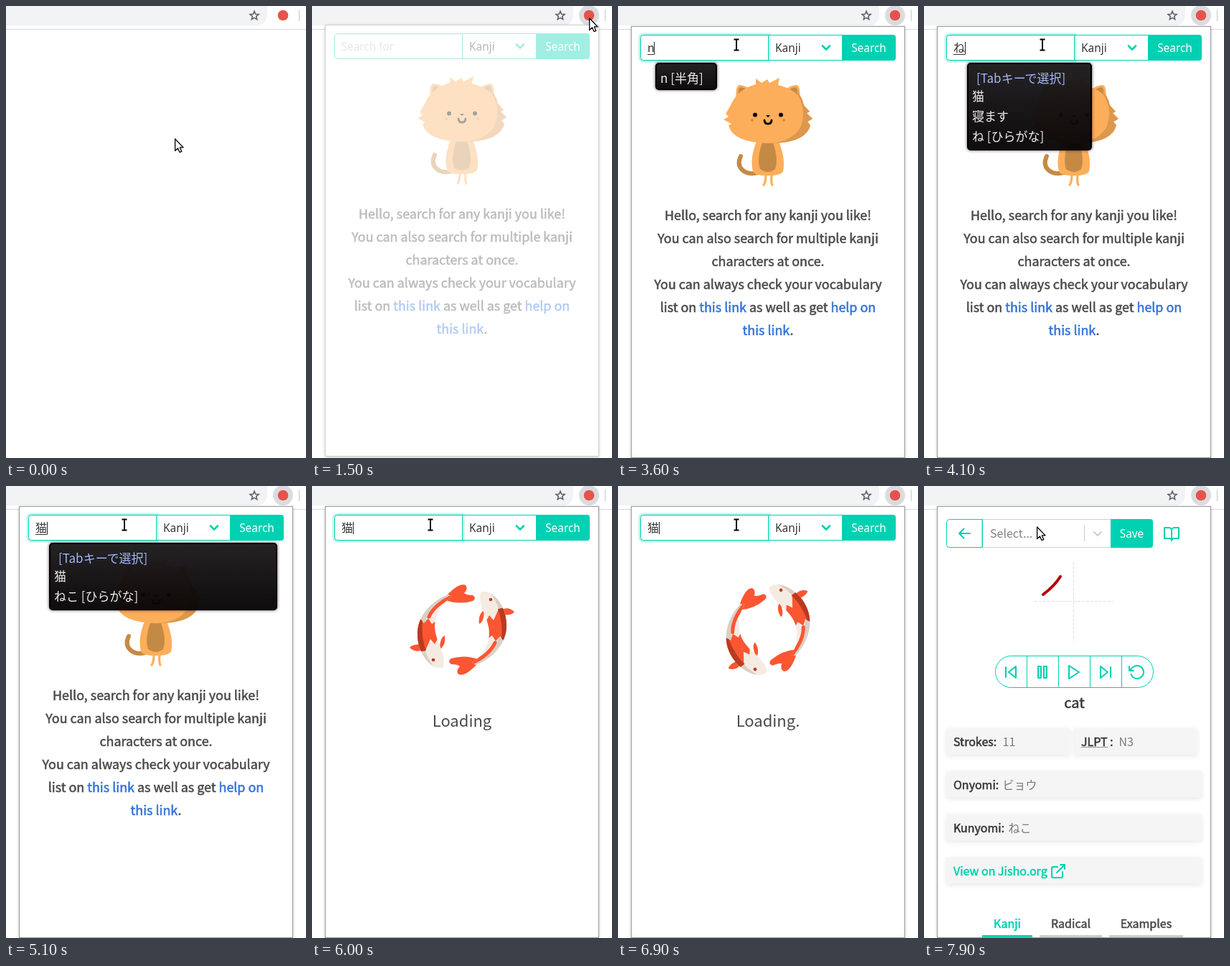
An HTML page that plays this animation: 418 by 629 pixels, repeating every 8000 ms.

```html
<!DOCTYPE html>
<html lang="en">
<head>
<meta charset="utf-8">
<title>Kanji search popup</title>
<style>
  html, body { margin: 0; width: 100%; height: 100%; overflow: hidden; background: #fff; }
  svg { display: block; }
  text { font: 16px "Noto Sans CJK JP", "Noto Sans CJK", sans-serif; fill: #4a4a4a; white-space: pre; }
  .ui { font: 15.4px "Noto Sans", sans-serif; }
  .mid { text-anchor: middle; }
  .bold { stroke: #4a4a4a; stroke-width: .55; }
  .dark { fill: #363636; stroke: #363636; }
  .teal { fill: #00d1b2; stroke: #00d1b2; }
  .hello { font-size: 17.9px; }
  .link { fill: #3273dc; stroke: #3273dc; }
  .white { fill: #fff; }
  .soft { fill: #7a7a7a; }
  .line { fill: none; stroke: #00d1b2; }
  .icon { fill: none; stroke: #00d1b2; stroke-width: 2; stroke-linecap: round; stroke-linejoin: round; }
  .card { fill: #f5f5f5; filter: drop-shadow(0 2px 3px rgba(0,0,0,.09)); }
  #ime text { font-size: 17px; fill: #eee; }
  #ime .tip { fill: #a3b6fb; }
</style>
</head>
<body>
<svg width="418" height="629" viewBox="0 0 418 629">
  <defs>
    <linearGradient id="glass" x2="0" y2="1">
      <stop offset="0" stop-color="#1c1c1c" stop-opacity=".9"/>
      <stop offset="1" stop-color="#000" stop-opacity=".87"/>
    </linearGradient>
    <path id="koiBody" d="M235 148C247 141 272 163 271 196C270 221 251 240 228 249L223 246C240 235 250 215 246 196C243 180 231 166 235 148Z"/>
    <clipPath id="koiClip"><use href="#koiBody"/></clipPath>
    <g id="koi">
      <path fill="#fb5632" d="M239 173Q231 180 233 192Q239 190 240 176ZM260 176Q271 165 282 175Q278 181 262 179Z"/>
      <path fill="#fb5632" d="M234 242Q214 234 194 240Q188 244 194 248Q203 248 206 251Q200 257 204 262Q213 266 230 248Z"/>
      <use href="#koiBody" fill="#f4ebe3"/>
      <g clip-path="url(#koiClip)">
        <path fill="#d9d0c6" d="M244 143Q264 166 264 196Q262 224 226 249L275 240V140Z"/>
        <path fill="#fb5632" d="M240 193L247 180L253 187L260 171L276 168V210L267 215L262 209L256 216L251 208L244 213Z"/>
        <path fill="#b93a22" d="M259 171Q266 188 264 212L267 215L276 210V168Z"/>
        <path fill="none" stroke="#fb5632" stroke-width="5" stroke-linecap="round" d="M255 218Q248 234 224 246"/>
      </g>
      <circle cx="249" cy="158" r="2.3" fill="#b93a22"/>
    </g>
  </defs>

  <!-- browser toolbar -->
  <path fill="#f1f3f4" d="M0 0H364V13A14 14 0 0 1 350 27H0Z"/>
  <path fill="none" stroke="#5f6368" stroke-width="1.6" d="M346 7.2L347.7 11.2L352 11.6L348.7 14.4L349.7 18.6L346 16.4L342.3 18.6L343.3 14.4L340 11.6L344.3 11.2Z"/>
  <path stroke="#d5dad9" d="M0 32.5H418"/>
  <path stroke="#c4c7c9" d="M408.5 5V21"/>
  <circle id="halo" cx="386" cy="13" r="14"/>
  <circle cx="386" cy="13" r="7.3" fill="#e5534b"/>

  <g id="popup">
    <rect x="18.5" y="28.5" width="381" height="600" fill="#fff" style="filter:drop-shadow(0 1px 2px rgba(0,0,0,.25))"/>
    <g id="inner">
      <rect x="18.5" y="28.5" width="381" height="600" fill="none" stroke="#9a9a9a"/>

      <g id="searchBar">
        <rect class="line" x="209.5" y="40.5" width="110" height="35"/>
        <text class="ui dark" stroke="none" style="stroke:none" x="219" y="63.5">Kanji</text>
        <path class="icon" style="stroke-width:2.6" d="M285 55.5L290 60.5L295 55.5"/>
        <path fill="#00d1b2" d="M312 40H383a4 4 0 0 1 4 4V72a4 4 0 0 1 -4 4H312Z"/>
        <text class="ui white mid" x="349.5" y="63.5">Search</text>
        <path id="glow" fill="none" stroke="#00d1b2" stroke-opacity=".25" stroke-width="5" d="M210 40H35a4 4 0 0 0 -4 4V72a4 4 0 0 0 4 4H210Z"/>
        <path fill="#fff" stroke="#00d1b2" d="M209.5 40.5H35.5a4 4 0 0 0 -4 4V71.5a4 4 0 0 0 4 4H209.5Z"/>
        <path stroke="#000" stroke-opacity=".05" d="M34 41.5H209"/>
        <text id="hint" class="ui" style="fill:#bfbfbf" x="40.5" y="63.5">Search for</text>
        <text id="typed" class="dark" style="stroke:none" x="41" y="64"></text>
        <path id="under" stroke="#363636" d=""/>
        <path id="caret" stroke="#222" d=""/>
      </g>

      <g id="welcome">
        <path fill="none" stroke="#c48a45" stroke-width="6" stroke-linecap="round" d="M194 232C178 236 163 226 171 209"/>
        <path fill="none" stroke="#fdae5a" stroke-width="3.2" stroke-linecap="round" d="M206 234Q206 245 203 249M214 234Q213 246 215 249"/>
        <path fill="#fdae5a" d="M194 186Q183 212 188 230Q190 236 209 236Q227 236 230 230Q234 212 223 186Z"/>
        <path fill="#c48a45" d="M201 190H216Q224 213 219 227Q209 235 198 227Q193 213 201 190Z"/>
        <path fill="#fdae5a" d="M165 132Q163 111 169 110Q178 110 187 118ZM253 132Q255 111 249 110Q240 110 231 118Z"/>
        <path fill="#c48a45" d="M168 128Q166 114 171 113Q178 114 183 119ZM250 128Q252 114 247 113Q240 114 235 119Z"/>
        <path fill="#fdae5a" d="M157 138Q166 116 192 109L192 101L200 107L208 102L211 107L225 100L223 110Q252 117 259 138L267 147L263 149L271 157L264 161L268 166Q262 191 209 191Q160 190 154 166L158 164L147 158L154 154L150 150Z"/>
        <path fill="#dc984c" d="M246 117Q264 142 255 167Q245 187 215 191Q262 190 268 166L264 161L271 157L263 149L267 147L259 138Q256 123 246 117Z"/>
        <circle cx="191" cy="151.5" r="3"/><circle cx="227" cy="151.5" r="3"/>
        <circle cx="187" cy="159" r="2" fill="#d18e45"/><circle cx="231" cy="159" r="2" fill="#d18e45"/>
        <path d="M206 152H212L209 155Z"/>
        <path fill="none" stroke="#000" stroke-width="2.8" stroke-linecap="round" d="M204 159Q204.500 164 209 164Q213.500 164 214 159"/>
        <g class="mid">
          <text class="hello bold" x="209" y="298">Hello, search for any kanji you like!</text>
          <text class="hello bold" x="209" y="330">You can also search for multiple kanji</text>
          <text class="hello bold" x="209" y="362">characters at once.</text>
          <text class="hello bold" x="209" y="394">You can always check your vocabulary</text>
          <text class="hello bold" x="209" y="426">list on <tspan class="link">this link</tspan> as well as get <tspan class="link">help on</tspan></text>
          <text class="hello bold" x="209" y="458"><tspan class="link">this link</tspan>.</text>
        </g>
      </g>

      <g id="loading">
        <g id="spin"><use href="#koi"/><use href="#koi" transform="rotate(180 209 200)"/></g>
        <text id="wait" class="mid" style="font-size:22px" x="209" y="335"></text>
      </g>

      <g id="result">
        <rect x="80.500" y="46.500" width="182" height="39" fill="#fff" stroke="#c5d6d3"/>
        <path class="line" d="M81.500 46.500H35.500a4 4 0 0 0 -4 4V81.500a4 4 0 0 0 4 4H81.500Z"/>
        <path class="icon" d="M64 66H49M55.500 59.500L49 66L55.500 72.500"/>
        <text x="92" y="72" style="fill:#808080">Select...</text>
        <path stroke="#ccc" d="M223.500 55V77"/>
        <path class="icon" style="stroke:#ccc" d="M237 64L242 69L247 64"/>
        <path fill="#00d1b2" d="M260 46H315a4 4 0 0 1 4 4V82a4 4 0 0 1 -4 4H260Z"/>
        <text class="ui white mid" x="289.500" y="71.500">Save</text>
        <path class="icon" transform="translate(333 55)" d="M2 3h6a4 4 0 0 1 4 4v14a3 3 0 0 0-3-3H2zM22 3h-6a4 4 0 0 0-4 4v14a3 3 0 0 1 3-3h7z"/>

        <path stroke="#ddd" stroke-dasharray="4 2" d="M208.500 106V215M154 160.500H263"/>
        <path id="brush" fill="none" stroke="#b60000" stroke-width="4" stroke-linecap="round" pathLength="1" d="M190 126Q182 139 166 151"/>

        <rect class="line" x="99.500" y="236.500" width="220" height="44" rx="22"/>
        <path class="line" d="M143.500 237V280M187.500 237V280M231.500 237V280M275.500 237V280"/>
        <path class="icon" transform="translate(109 247)" d="M19 20L9 12L19 4ZM5 19V5"/>
        <path class="icon" transform="translate(153 247)" d="M6 4h4v16h-4ZM14 4h4v16h-4Z"/>
        <path class="icon" transform="translate(197 247)" d="M5 3L19 12L5 21Z"/>
        <path class="icon" transform="translate(241 247)" d="M5 4L15 12L5 20ZM19 5V19"/>
        <path class="icon" transform="translate(285 247)" d="M1 4V10H7M3.510 15a9 9 0 1 0 2.130-9.360L1 10"/>
        <text class="bold dark mid" style="font-size:20px" x="209.500" y="309">cat</text>

        <rect class="card" x="31" y="337" width="172" height="37" rx="3"/>
        <rect class="card" x="209" y="337" width="172" height="37" rx="3"/>
        <rect class="card" x="31" y="396.500" width="356" height="37" rx="3"/>
        <rect class="card" x="31" y="456.500" width="356" height="37" rx="3"/>
        <rect class="card" x="31" y="516.500" width="356" height="37" rx="3"/>
        <text class="bold dark" x="41" y="362">Strokes:</text><text class="soft" x="109.500" y="362">11</text>
        <text class="bold dark" x="219" y="362">JLPT</text><text class="bold dark" x="259" y="362">:</text>
        <path stroke="#363636" stroke-dasharray="1 1" d="M219 363.500H257"/>
        <text class="soft" x="271.500" y="362">N3</text>
        <text class="bold dark" x="41" y="422">Onyomi:</text><text class="soft" x="109.500" y="422">ビョウ</text>
        <text class="bold dark" x="41" y="482">Kunyomi:</text><text class="soft" x="117.500" y="482">ねこ</text>
        <text class="bold teal" x="41" y="542">View on Jisho.org</text>
        <path class="icon" transform="translate(175 524)" d="M18 13v6a2 2 0 0 1-2 2H5a2 2 0 0 1-2-2V8a2 2 0 0 1 2-2h6M15 3h6v6M10 14L21 3"/>

        <text class="bold teal mid" x="116" y="615">Kanji</text>
        <text class="bold mid" x="204.500" y="615">Radical</text>
        <text class="bold mid" x="309.500" y="615">Examples</text>
        <path stroke="#00d1b2" stroke-width="3" d="M81 626.500H151"/>
        <path stroke="#ccc" stroke-width="3" d="M161 626.500H248M258 626.500H361"/>
      </g>
    </g>
  </g>

  <g id="ime"></g>
  <path id="arrow" fill="#fff" stroke="#000" stroke-width="1.300" stroke-linejoin="round" d="M.6 1V17.500L4.400 14L7 19.600L9.800 18.400L7.300 12.900H12Z"/>
  <g id="beam" fill="none">
    <path stroke="#fff" stroke-width="4" d="M-4 -7.500H4M0 -7V7M-4 7.500H4"/>
    <path stroke="#000" stroke-width="1.800" d="M-3.500 -7.500H3.500M0 -7V7M-3.500 7.500H3.500"/>
  </g>
</svg>

<script>
const LOOP = 8000, STEP = 100;
const $ = id => document.getElementById(id);
const show = (id, on) => { $(id).style.display = on ? '' : 'none'; };
const clamp = v => Math.max(0, Math.min(1, v));
const ease = p => p * p * (3 - 2 * p);

// time, x, y of the pointer
const path = [
  [300, 235, 184], [750, 399, 24], [900, 386, 16], [1700, 386, 16],
  [2250, 165, 54], [7700, 165, 54], [7850, 157, 56]
];

const TIP = '[Tabキーで選択]';
// time, text, text width, list left, list right, list rows
const typing = [
  [0, '', 0],
  [3500, 'n', 9],
  [3600, 'n', 9, 53, 137, ['n [半角]']],
  [3800, 'に', 16, 61, 297, [TIP, '日本', '日本語を勉強しています', 'に [ひらがな]']],
  [4100, 'ね', 16, 61, 233, [TIP, '猫', '寝ます', 'ね [ひらがな]']],
  [4300, 'ねk', 25, 70, 250, [TIP, '猫', '寝込みます', 'ねk [ひらがな]']],
  [4500, 'ねこ', 32, 78, 250, [TIP, '猫', 'ねこ [ひらがな]']],
  [5000, '猫', 16, 61, 409, [TIP, '猫', 'ねこ [ひらがな]']],
  [5100, '猫', 16, 61, 377, [TIP, '猫', 'ねこ [ひらがな]']],
  [5600, '猫', 16]
];

function pointer(t) {
  const i = path.findIndex(p => p[0] > t);
  if (i === 0) return path[0].slice(1);
  if (i < 0) return path[path.length - 1].slice(1);
  const [a, b] = [path[i - 1], path[i]];
  const p = ease((t - a[0]) / (b[0] - a[0]));
  return [a[1] + (b[1] - a[1]) * p, a[2] + (b[2] - a[2]) * p];
}

function list(left, right, rows) {
  if (!rows) return '';
  const w = right - left, h = 8 + rows.length * 28;
  const lines = rows.map((row, i) => {
    const tip = row === TIP;
    const y = i ? 104 + i * 28 : 107;
    return `<text class="${tip ? 'tip' : ''}" x="${left + (tip ? 12 : 6)}" y="${y}">${row}</text>`;
  });
  return `<rect x="${left}" y="80" width="${w}" height="${h}" rx="4" fill="url(#glass)" stroke="#000"
    stroke-width="2" style="filter:drop-shadow(0 0 2px rgba(60,30,50,.8))"/>` + lines.join('');
}

let lastRow;
function drawTyping(t) {
  const row = typing.filter(r => r[0] <= t).pop();
  const [start, text, w, left, right, rows] = row;
  const x = 41.5 + w;
  const since = t - (start || 2400);
  const caretOn = t >= 2400 && (rows || Math.floor(since / 600) % 2 === 0);
  $('caret').setAttribute('d', caretOn ? `M${x} 50V67` : '');
  if (row === lastRow) return;
  lastRow = row;
  $('typed').textContent = text;
  $('under').setAttribute('d', text && start < 5600 ? `M41 67.5H${x}` : '');
  $('ime').innerHTML = list(left, right, rows);
  show('hint', !text);
}

function draw(t) {
  const open = clamp(.36 + (t - 1500) / 300);
  show('popup', t >= 1500);
  $('popup').setAttribute('transform', `translate(0 ${t < 1600 ? -2 : t < 1700 ? -1 : 0})`);
  $('inner').setAttribute('opacity', open);
  $('halo').setAttribute('fill', t >= 1500 ? '#dadce0' : t >= 800 ? '#f3f4f4' : 'none');

  const done = t >= 7300;
  show('searchBar', !done);
  show('welcome', t < 6000);
  show('loading', t >= 6000 && !done);
  show('result', done);
  show('glow', t >= 2400);
  drawTyping(t);

  const run = t - 6000;
  $('spin').setAttribute('transform', `rotate(${-205.5 * run / 900} 209 200)`);
  $('wait').textContent = 'Loading' + '.'.repeat(clamp(run / 2000) * 4);

  $('result').setAttribute('opacity', clamp((t - 7200) / 500));
  const drawn = clamp((t - 7600) / 300);
  show('brush', drawn > 0);
  $('brush').setAttribute('stroke-dasharray', drawn < 1 ? `${drawn} 2` : 'none');

  const [x, y] = pointer(t);
  const beam = t > 1700 && x < 208 && !done;
  show('arrow', !beam);
  show('beam', beam);
  $(beam ? 'beam' : 'arrow').setAttribute('transform', `translate(${x} ${y})`);
}

const begin = performance.now();
function tick() {
  const t = (performance.now() - begin) % LOOP;
  draw(Math.floor(t / STEP) * STEP);
  requestAnimationFrame(tick);
}
tick();
</script>
</body>
</html>
```
